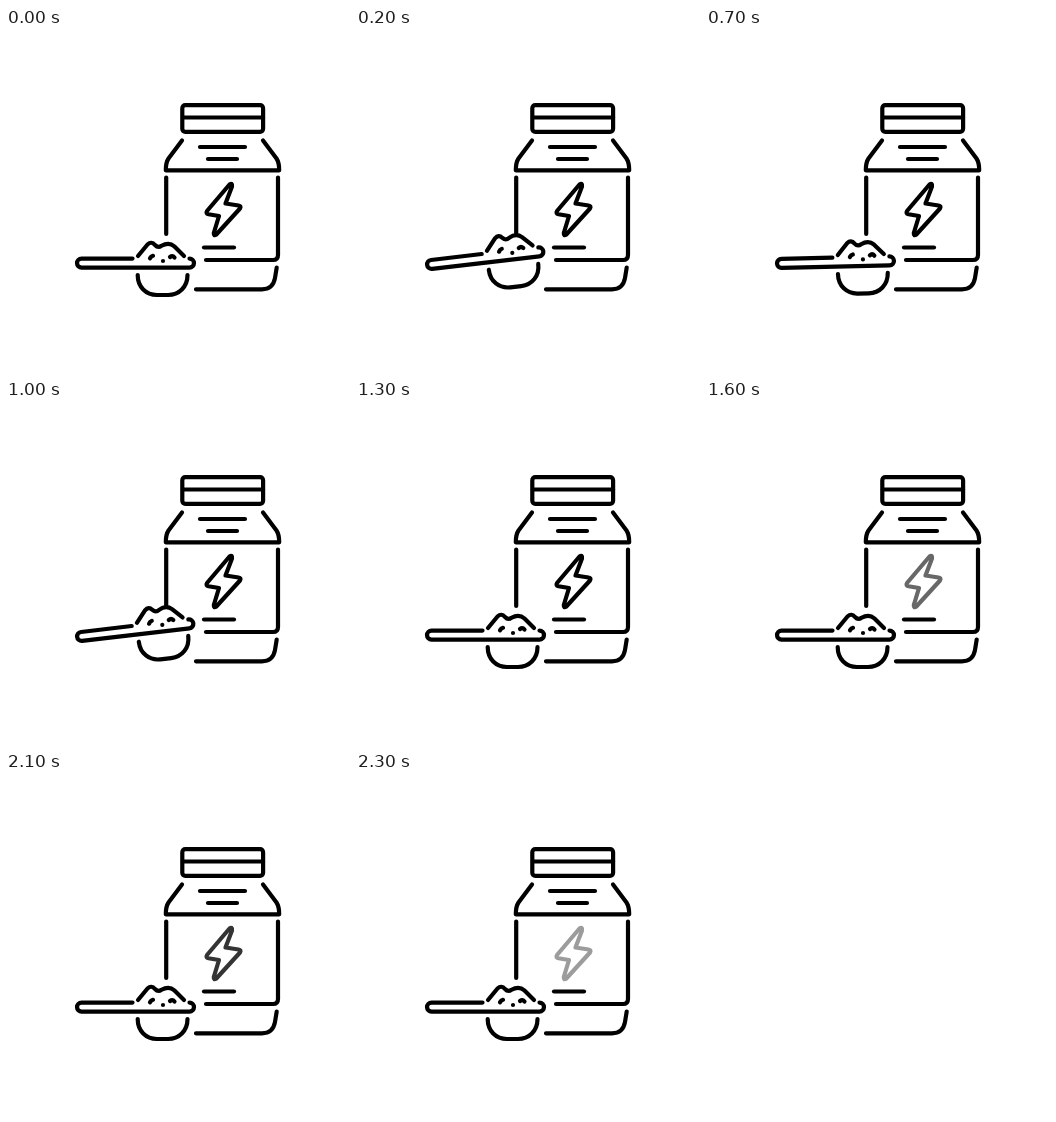
These frames come from a looping animation (344 px wide and 344 px high, 2400 ms). An HTML page:

```html
<!DOCTYPE html>
<html lang="en">
<head>
<meta charset="utf-8">
<title>Protein powder</title>
<style>
  html, body { margin: 0; width: 100%; height: 100%; overflow: hidden; background: #fff; }
  svg { display: block; width: 100vw; height: 100vh; }
</style>
</head>
<body>
<svg viewBox="0 0 344 344" fill="none" stroke="#000" stroke-width="4.2" stroke-linecap="round" stroke-linejoin="round">
  <g id="jar">
    <rect x="176.3" y="77.2" width="80.8" height="26.6" rx="3"/>
    <path d="M177 89.5H257"/>
    <path d="M176 112.500L162.500 130.500Q159.800 134.500 159.800 142.300H273.200Q273.200 134.500 270.500 130.500L257 112.500"/>
    <path d="M194 119H239M202 131H231"/>
    <path d="M160.200 149.500V206"/>
    <path d="M272 149.500V227Q272 232 267 232H200"/>
    <path d="M198 219.500H228"/>
    <path d="M270.700 239.500L269 250Q267 261.300 256 261.300H190"/>
  </g>
  <path id="bolt" d="M223.500 156.500L201 183Q199.500 185.500 202.500 186.200L213 188L207.800 205Q207.500 208.500 210.300 206.500L234 180.500Q235.500 178 232.500 177.500L219.500 175.500L226 158.500Q226.500 154.500 223.500 156.500Z"/>
  <g id="scoop">
    <path d="M126.500 230.600H75.500a4.500 4.500 0 0 0 0 9H183.500a4.500 4.500 0 0 0 0-9"/>
    <path d="M132 228L141.500 216.500Q145.500 212.800 149 217Q152 220.300 155.500 217.800Q163 213.500 168.500 218.500L178 228"/>
    <path d="M144 230.300Q145 228.300 147 227.800M157 233V233.010M164 229Q166.500 227 168.500 229.500"/>
    <path d="M131.700 247C131.700 259 140 267 151 267H162C173 267 181.500 259 181.500 247"/>
  </g>
</svg>
<script>
const LOOP = 2400, STEP = 100, PULSE = 600;
const SCOOP_END = 1200, FADE_START = 1400;
const LIFT = 10.3, FADE = 0.61;
const scoop = document.getElementById("scoop");
const bolt = document.getElementById("bolt");

// Scoop lifts twice, pivoting near the end of its handle.
const scoopAngle = t => t < SCOOP_END ? -LIFT * Math.abs(Math.sin(Math.PI * t / PULSE)) ** 3 : 0;

// Bolt then fades out and back linearly until the loop restarts.
function boltOpacity(t) {
  if (t < FADE_START) return 1;
  const phase = (t - FADE_START) % PULSE / PULSE;
  return 1 - FADE * (1 - Math.abs(2 * phase - 1));
}

function draw(now) {
  const t = Math.floor(now % LOOP / STEP) * STEP;
  scoop.setAttribute("transform", `rotate(${scoopAngle(t).toFixed(3)} 87 235)`);
  bolt.setAttribute("opacity", boltOpacity(t).toFixed(3));
}

let start;
function tick(now) {
  start ??= now;
  draw(now - start);
  requestAnimationFrame(tick);
}
draw(0);
requestAnimationFrame(tick);
</script>
</body>
</html>
```
